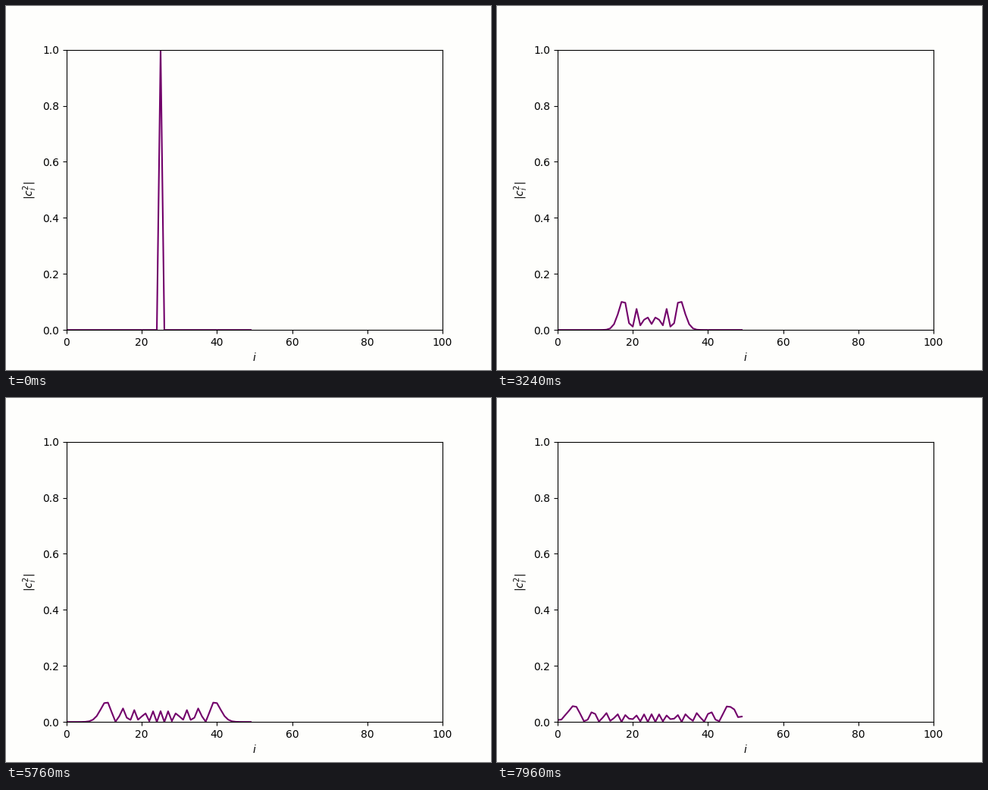
Write a matplotlib script that moves like this. It is 640 px wide and 480 px high and loops after 8000 ms.

```python
import numpy as np
import matplotlib.pyplot as plt
from matplotlib.animation import FuncAnimation

SITES, START = 50, 25
FRAMES, INTERVAL = 200, 40
STEP = 0.1155  # phase 2Jt gained per frame
PAPER, PURPLE = "#fefefc", "#72006a"

# Open tight-binding chain, hopping 1/2, diagonalised once
hop = 0.5 * np.ones(SITES - 1)
energy, modes = np.linalg.eigh(np.diag(hop, 1) + np.diag(hop, -1))
sites = np.arange(SITES)


def density(phase):
    amp = modes @ (np.exp(-1j * energy * phase) * modes[START])
    return np.abs(amp) ** 2


fig, ax = plt.subplots(figsize=(6.4, 4.8), dpi=100, facecolor=PAPER)
ax.set_facecolor(PAPER)
ax.set_xlim(0, 100)
ax.set_ylim(0, 1)
ax.set_xlabel(r"$i$")
ax.set_ylabel(r"$|c_i^2|$")
line, = ax.plot(sites, density(0), color=PURPLE, lw=1.5)


def update(n):
    # The walk starts one frame late
    line.set_ydata(density(STEP * max(n - 1, 0)))
    return line,


anim = FuncAnimation(fig, update, frames=FRAMES, interval=INTERVAL,
                     repeat=True, repeat_delay=0)
plt.show()
```
